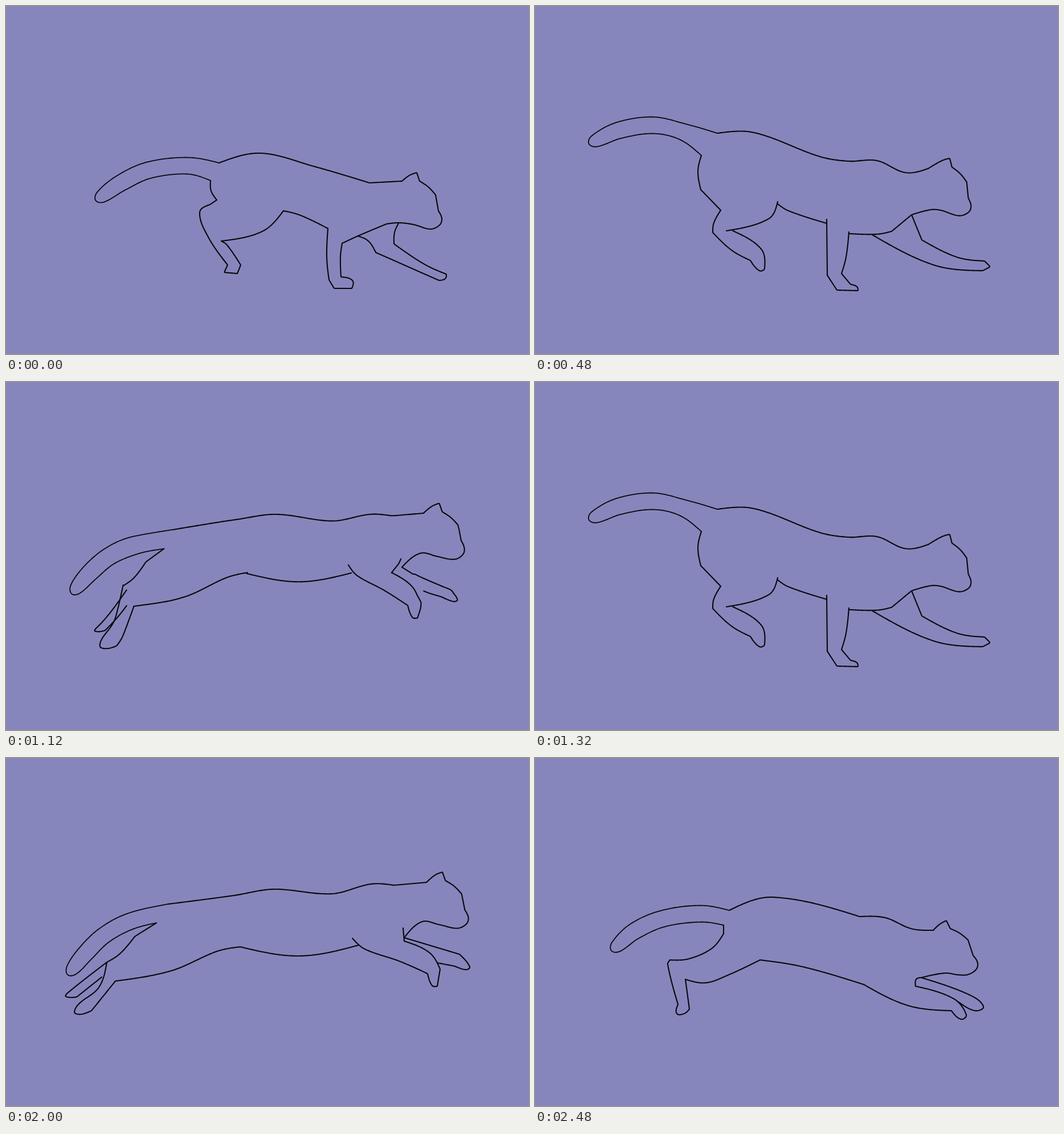
These frames come from a looping animation (918x610 px, 2520 ms). An HTML page with a canvas:

```html
<!DOCTYPE html>
<html lang="en">
<head>
<meta charset="utf-8">
<title>Running cat</title>
<style>
html, body { margin: 0; width: 100%; height: 100%; overflow: hidden; background: #8786bc; }
canvas { display: block; width: 918px; height: 610px; }
</style>
</head>
<body>
<canvas id="stage" width="918" height="610"></canvas>
<script>
// Key poses. Each part is a smooth stroke through a few points; * marks a sharp corner.
// The tail is a spine that gets its width from a rule; the head is one shape, placed and tilted.
const plant = {
  spine: "318,280 250,288 202,310 166,335",
  ear: "721,292", tilt: 0, jaw: "715,383 690,380 668,382",
  back: "374,275 447,258 540,281 638,310* 695,307",
  chest: "668,382 618,403 590,416",
  farFore: "689,381 682,397 681,417* 735,453 773,470* 771,478 760,481* 649,432* 636,412 617,403",
  fore: "590,416 587,440 588,475* 608,481 607,495* 576,495* 567,480* 563,440 565,390",
  belly: "565,390 517,367 487,359",
  thigh: "487,359 450,395 378,412",
  hind: "378,412 388,419 412,454* 406,469* 383,467* 389,454* 355,405 340,362 358,348* 370,340",
  rump: "370,340 360,324 359,306"
};
const fold = {
  spine: "306,285 247,269 188,289 157,316",
  ear: "728,289", tilt: 0.07, jaw: "710,380 690,380 671,382",
  back: "359,273 463,238 567,274* 612,295 662,304* 701,302",
  chest: "671,382 640,403* 543,414",
  farFore: "671,382 640,417* 645,412* 647,423 680,463 709,490* 700,498 685,494* 640,458 597,425 590,410",
  fore: "546,414 532,438 518,475* 533,490* 530,496* 506,495* 497,465 530,375 558,348",
  belly: "530,375 491,364",
  thigh: "501,352 468,391 452,403* 420,405",
  hind: "420,405 471,436 475,445 463,459* 449,444* 410,422 372,403 357,384* 362,364 377,345",
  rump: "385,348 364,333 357,312",
  farHind: "420,404 465,415 478,430 474,441"
};
const leap = {
  spine: "216,287 172,311 139,343 115,372",
  ear: "766,200", tilt: -0.02, jaw: "760,292 730,287 699,315",
  back: "285,256 400,241 470,230 572,238 640,221 681,223* 738,218",
  chest: "697,298 699,321",
  farFore: "699,315 796,344* 814,366 808,371 788,365* 757,359",
  fore: "699,321 743,341 762,370* 757,400* 748,399 740,378* 690,356 630,335 608,316",
  belly: "619,328 515,347 411,331",
  thigh: "411,331 370,339 290,373 192,391",
  hind: "192,391 150,443* 122,448 126,433 163,402 177,358",
  rump: "177,358 200,343 226,313* 264,289",
  farHind: "177,358 108,412 105,418 124,419* 168,384"
};
const reach = {
  spine: "258,220 207,209 147,218 104,237",
  ear: "728,267", tilt: 0.08, jaw: "712,358 695,357 661,366",
  back: "320,223 385,222 500,264 550,272 600,271 650,292 690,285",
  chest: "661,366 626,395* 600,400 551,399",
  farFore: "661,366 679,410* 740,440 789,447* 799,457* 786,464* 700,454 592,401",
  fore: "551,396 546,440 538,469* 554,488* 565,492 567,499* 530,498* 513,472* 512,374",
  belly: "512,381 445,359 426,347",
  thigh: "426,343 410,373 336,394",
  hind: "347,394 397,426 403,460 394,464 378,446* 345,428 312,397* 314,380 326,358",
  rump: "326,358 291,322* 286,290 292,262"
};
const stretch = {
  spine: "290,273 223,282 174,304 142,331",
  ear: "722,285", tilt: -0.14, jaw: "742,380 720,377 678,385",
  back: "341,267 418,244 570,278* 615,280 660,299 699,302",
  chest: "678,385 669,388 668,400",
  farFore: "678,385 760,414 787,435 773,443 744,428",
  fore: "668,400 735,422 757,450 748,458 731,443* 655,434 577,397",
  belly: "577,397 470,366 395,354",
  thigh: "395,354 340,380 300,394 264,388",
  hind: "264,388 271,440* 262,448 249,448 251,432* 233,362 237,354",
  rump: "237,354 270,352 310,334 331,308* 331,293"
};
// Ear, brow, nose and chin, measured from the tip of the ear.
const HEAD = "-13,5 0,0* 5,15* 20,25 33,39* 38,67* 44,81 40,92 24,99";

const STEP = 40, CYCLE = 21, SAMPLES = 160;
const TAIL_HALF = 14.5, TIP_RADIUS = 10.5;
const mix = (a, b, k) => a + (b - a) * k;
const dist = (a, b) => Math.hypot(b.x - a.x, b.y - a.y);
const midpoint = (a, b) => ({ x: (a.x + b.x) / 2, y: (a.y + b.y) / 2 });

const parse = text => text.split(" ").map(s => {
  const [x, y] = s.split(",").map(parseFloat);
  return { x, y, sharp: s.endsWith("*") };
});

function tailOutline(spine, top, bottom) {
  const path = [midpoint(top, bottom), ...spine];
  const upper = [], lower = [];
  let tip;
  for (let i = 1; i < path.length; i++) {
    const p = path[i], end = i === path.length - 1;
    const a = path[i - 1], b = end ? p : path[i + 1];
    const r = end ? TIP_RADIUS : TAIL_HALF;
    const ux = (b.x - a.x) / dist(a, b) * r, uy = (b.y - a.y) / dist(a, b) * r;
    upper.push({ x: p.x - uy * -1, y: p.y - ux * -1 * -1 * -1 });
    lower.push({ x: p.x - uy, y: p.y + ux });
    tip = { x: p.x + ux, y: p.y + uy };
    upper[i - 1].y = p.y - ux;
  }
  // Heading left, the left-hand normal points down.
  return [bottom, ...upper, tip, ...lower.reverse(), top];
}

function headOutline(pose, start) {
  const [ear] = parse(pose.ear), c = Math.cos(pose.tilt), s = Math.sin(pose.tilt);
  const face = parse(HEAD).map(p => ({
    x: ear.x + p.x * c - p.y * s, y: ear.y + p.x * s + p.y * c, sharp: p.sharp
  }));
  return [start, ...face, ...parse(pose.jaw)];
}

// Smooth curve through the points, resampled at even distances.
function trace(pts) {
  const inner = i => i > 0 && i < pts.length - 1 && !pts[i].sharp;
  const through = (i, len) => {
    const a = pts[i - 1], b = pts[i + 1], k = len / (dist(a, b) || 1);
    return [(b.x - a.x) * k, (b.y - a.y) * k];
  };
  const line = [{ ...pts[0], d: 0 }];
  for (let i = 0; i + 1 < pts.length; i++) {
    const p = pts[i], q = pts[i + 1], len = dist(p, q);
    const chord = [q.x - p.x, q.y - p.y];
    const free = m => chord.map((c, n) => 1.5 * c - 0.5 * m[n]);
    let m = inner(i) && through(i, len), n = inner(i + 1) && through(i + 1, len);
    m = m || free(n || chord);
    n = n || free(m);
    for (let j = 1; j <= 16; j++) {
      const t = j / 16, e = t * t * (3 - 2 * t);
      const u = t * (1 - t) * (1 - t), v = t * t * (t - 1);
      const next = {
        x: mix(p.x, q.x, e) + u * m[0] + v * n[0],
        y: mix(p.y, q.y, e) + u * m[1] + v * n[1]
      };
      const last = line[line.length - 1];
      line.push({ ...next, d: last.d + dist(last, next) });
    }
  }
  const total = line[line.length - 1].d, out = [];
  for (let s = 0, i = 1; s <= SAMPLES; s++) {
    const d = total * s / SAMPLES;
    while (i < line.length - 1 && line[i].d < d) i++;
    const a = line[i - 1], b = line[i], k = (d - a.d) / (b.d - a.d || 1);
    out.push({ x: mix(a.x, b.x, k), y: mix(a.y, b.y, k) });
  }
  return out;
}

function build({ spine, ear, tilt, jaw, ...strokes }) {
  const pts = {};
  for (const name in strokes) pts[name] = parse(strokes[name]);
  pts.tail = tailOutline(parse(spine), pts.back[0], pts.rump[pts.rump.length - 1]);
  pts.head = headOutline({ ear, tilt, jaw }, pts.back[pts.back.length - 1]);
  const parts = {};
  for (const name in pts) parts[name] = trace(pts[name]);
  return parts;
}

// Two strides make one cycle; on the way to the next pose the hind feet dip or the body lifts.
const keys = [
  { at: 0, pose: plant },
  { at: 1, pose: fold, dip: 45 },
  { at: 8, pose: leap, lift: 18 },
  { at: 12, pose: reach, dip: 75 },
  { at: 20, pose: stretch },
  { at: CYCLE, pose: plant }
].map(k => ({ dip: 0, lift: 0, ...k, parts: build(k.pose) }));

const ctx = document.getElementById("stage").getContext("2d");
ctx.lineCap = ctx.lineJoin = "round";
ctx.strokeStyle = "#07070c";

function draw(step) {
  const i = keys.findIndex(k => k.at > step);
  const from = keys[i - 1], to = keys[i];
  const k = (step - from.at) / (to.at - from.at), swing = Math.sin(Math.PI * k);
  ctx.fillStyle = "#8786bc";
  ctx.fillRect(0, 0, 918, 610);
  for (const name in from.parts) {
    const a = from.parts[name], b = to.parts[name] || to.parts.hind;
    const dip = /hind/i.test(name) ? from.dip * swing : 0;
    ctx.lineWidth = name === "tail" ? 1.8 : 2.1;
    ctx.beginPath();
    a.forEach((p, n) => ctx.lineTo(
      mix(p.x, b[n].x, k),
      mix(p.y, b[n].y, k) + dip * Math.sin(Math.PI * n / SAMPLES) - from.lift * swing
    ));
    ctx.stroke();
  }
}

const start = performance.now();
function tick() {
  draw(Math.floor((performance.now() - start) / STEP) % CYCLE);
  requestAnimationFrame(tick);
}
tick();
</script>
</body>
</html>
```
